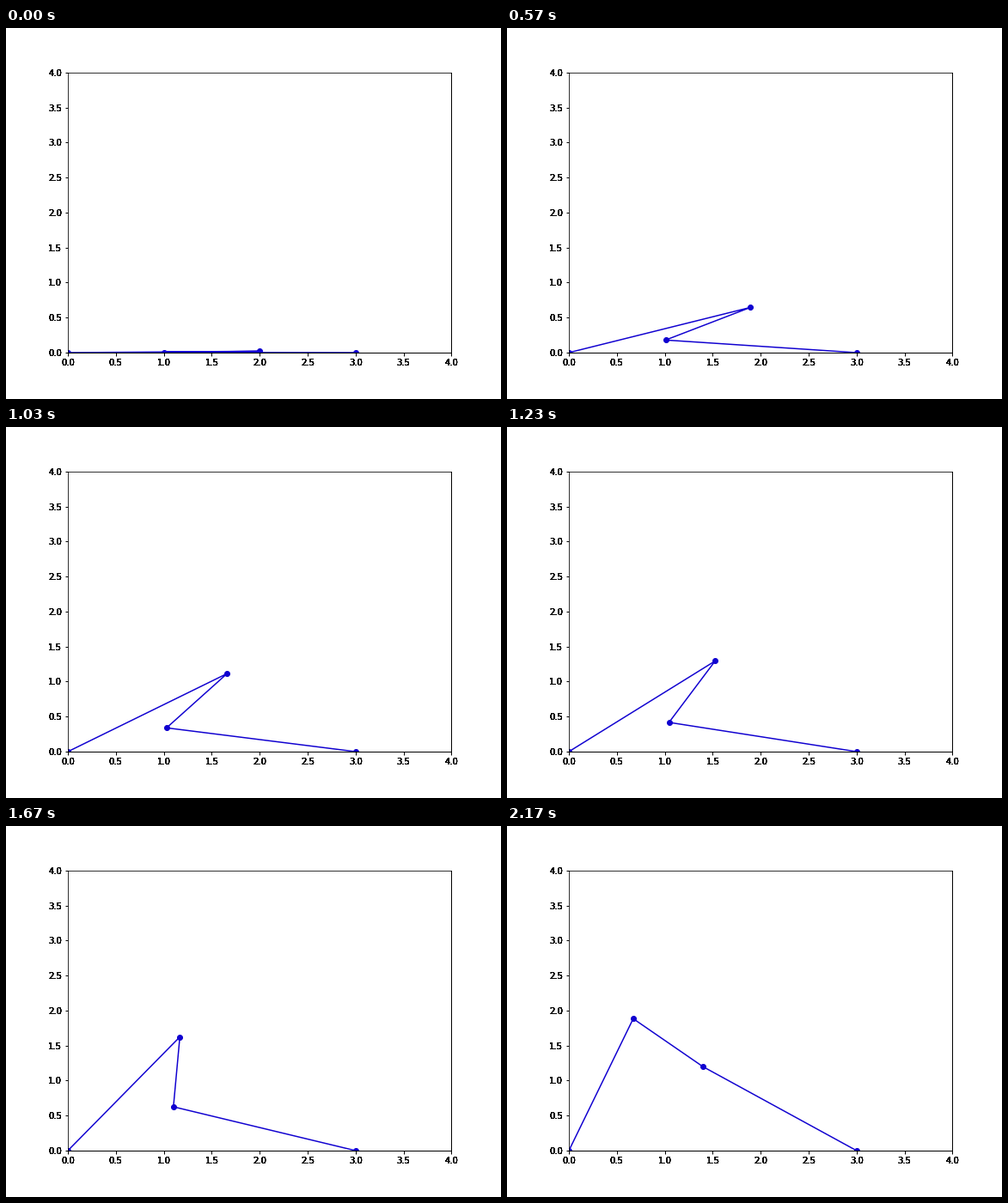
These frames come from a looping animation (576 px wide and 432 px high, 2210 ms). A matplotlib script:

```python
import numpy as np
import matplotlib.pyplot as plt
from matplotlib.animation import FuncAnimation

# Four-bar linkage: crank, coupler, rocker and the fixed base between pivots.
CRANK, COUPLER, ROCKER, BASE = 2.0, 1.0, 2.0, 3.0
POSES = 66
ANGLES = np.linspace(0.01, 1.2287, POSES)

TICK_MS = 10
LOOP_MS = 2210

TICKS = np.arange(0, 4.1, 0.5)
TICK_LENGTH = LABEL_PAD = 3.5
OVERPRINTS = 7

plt.rcParams.update({"font.family": "DejaVu Sans", "font.size": 10})

fig, ax = plt.subplots(figsize=(8, 6), dpi=72)
fig.subplots_adjust(left=0.125, right=0.9, bottom=0.125, top=0.88)
ax.set(xlim=(0, 4), ylim=(0, 4), xticks=TICKS, yticks=TICKS)
ax.tick_params(length=TICK_LENGTH, pad=LABEL_PAD, width=1)
ax.spines[["right", "bottom"]].set_linewidth(1)
linkage, = ax.plot([], [], "o-", color="#1000d0", lw=1.5, ms=6)


def overprint_labels():
    """Draw the tick labels again on top, which hardens their soft edges."""
    pad = TICK_LENGTH + LABEL_PAD
    x_place, x_va, x_ha = ax.get_xaxis_text1_transform(pad)
    y_place, y_va, y_ha = ax.get_yaxis_text1_transform(pad)
    for value in TICKS:
        label = f"{value:.1f}"
        ax.text(value, 0, label, transform=x_place, va=x_va, ha=x_ha)
        ax.text(0, value, label, transform=y_place, va=y_va, ha=y_ha)


def joints(angle):
    """Return x and y of the four joints for a crank angle."""
    px, py = CRANK * np.cos(angle), CRANK * np.sin(angle)
    reach = np.hypot(BASE - px, py)
    cos_inner = (reach**2 + ROCKER**2 - COUPLER**2) / (2 * reach * ROCKER)
    rocker = np.arctan2(py, BASE - px) - np.arccos(min(cos_inner, 1.0))
    qx, qy = BASE - ROCKER * np.cos(rocker), ROCKER * np.sin(rocker)
    return [0, px, qx, BASE], [0, py, qy, 0]


def update(tick):
    # Thirty poses per second, snapped to the 10 ms clock.
    pose = min((3 * tick + 1) // 10, POSES - 1)
    linkage.set_data(*joints(ANGLES[pose]))
    return linkage,


for _ in range(OVERPRINTS):
    overprint_labels()

anim = FuncAnimation(fig, update, frames=LOOP_MS // TICK_MS, interval=TICK_MS,
                     repeat=True, repeat_delay=0, blit=False)
plt.show()
```
